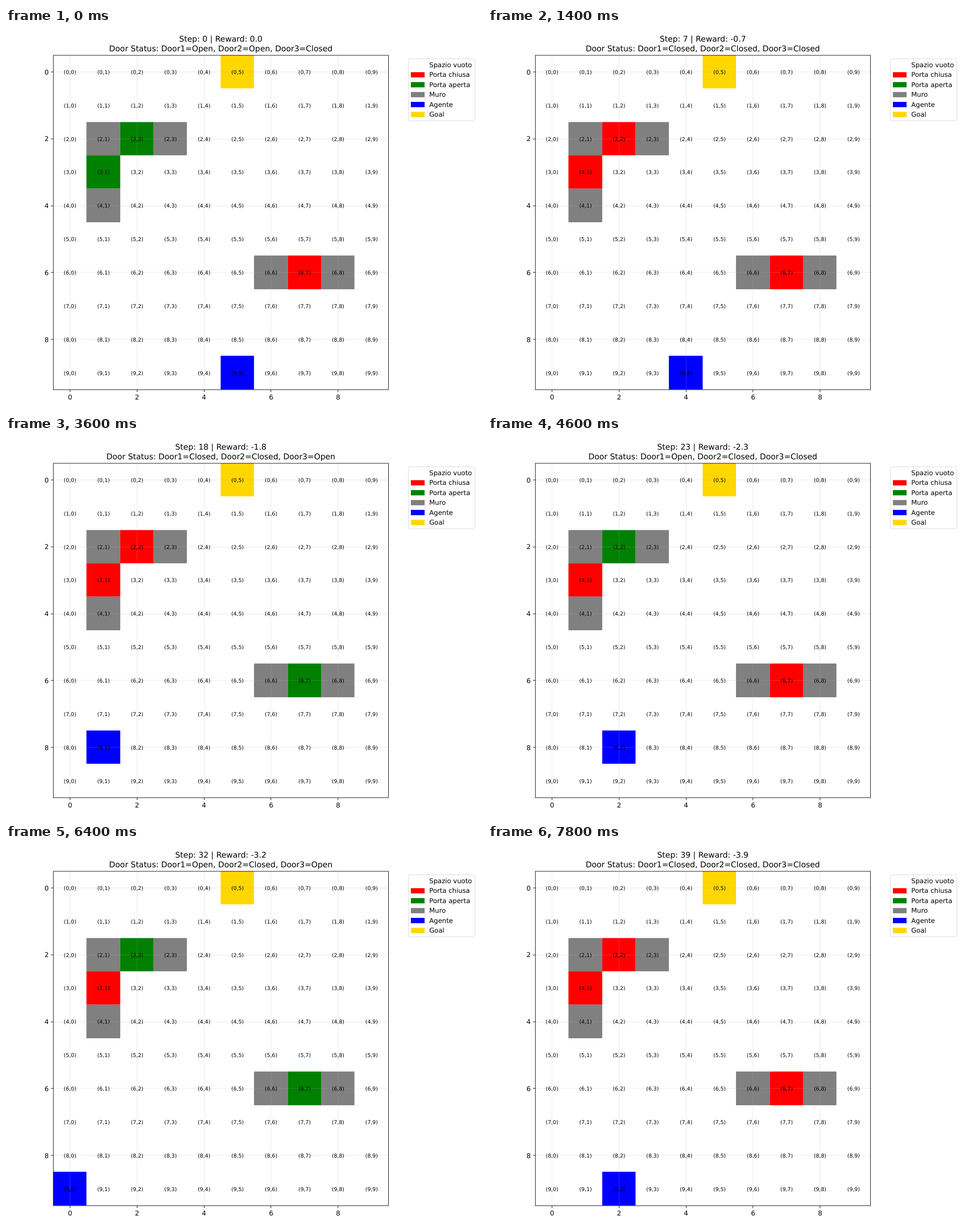
These frames come from a looping animation (837 px wide and 669 px high, 8 s). An HTML page:

```html
<!DOCTYPE html>
<html lang="it">
<head>
<meta charset="utf-8">
<title>Grid agent</title>
<style>
  html, body { margin: 0; width: 100%; height: 100%; overflow: hidden; background: #fff; }
  svg { display: block; width: 837px; height: 669px; }
  text { font-family: "DejaVu Sans", Verdana, sans-serif; text-anchor: middle; text-rendering: geometricPrecision; }
  .left { text-anchor: start; }
</style>
</head>
<body>
<svg id="stage" viewBox="0 0 1000 800" preserveAspectRatio="none"></svg>
<script>
// The plot is laid out on a 1000 x 800 sheet at 100 dots per inch
const STEP_MS = 200, N = 10, PITCH = 70.4, LEFT = 99.3, TOP = 57.25;
const pt = size => size * 100 / 72;

const EMPTY = '#ffffff', RED = '#ff0000', GREEN = '#008000';
const GRAY = '#808080', BLUE = '#0000ff', GOLD = '#ffd700';

// One letter per step: up, down, left, right, or a dot for staying
const MOVES = '...L...LLLL...U.R..L.RR.L.L.D.....R..R.';
const DIRS = { U: [-1, 0], D: [1, 0], L: [0, -1], R: [0, 1], '.': [0, 0] };
const STEPS = MOVES.length + 1;

const walls = [[2, 1], [2, 3], [4, 1], [6, 6], [6, 8]];
const doors = [
  { at: [2, 2], open: true, toggles: [7, 22, 38] },
  { at: [3, 1], open: true, toggles: [3] },
  { at: [6, 7], open: false, toggles: [16, 20, 27, 34] }
];

const svg = document.getElementById('stage');
const mid = (origin, i) => origin + PITCH * (i + 0.5);
const edge = (origin, i) => Math.round(origin + PITCH * i - 0.45);
const snap = v => Math.floor(v) + 0.5;

function add(tag, attrs, text) {
  const el = document.createElementNS(svg.namespaceURI, tag);
  set(el, attrs);
  if (text !== undefined) el.textContent = text;
  return svg.appendChild(el);
}

function set(el, attrs) {
  for (const key in attrs) el.setAttribute(key, attrs[key]);
}

function line(x1, y1, x2, y2, stroke) {
  add('line', { x1, y1, x2, y2, stroke });
}

function label(x, y, size, text, cls = '') {
  return add('text', { x, y, 'font-size': pt(size), class: cls }, text);
}

function place(el, [r, c]) {
  const x = edge(LEFT, c), y = edge(TOP, r);
  set(el, { x, y, width: edge(LEFT, c + 1) - x, height: edge(TOP, r + 1) - y });
}

function cell(pos, fill) {
  const el = add('rect', { fill });
  place(el, pos);
  return el;
}

const x0 = snap(LEFT), x1 = snap(LEFT + N * PITCH);
const y0 = snap(TOP), y1 = snap(TOP + N * PITCH);

add('rect', { width: 1000, height: 800, fill: EMPTY });
walls.forEach(pos => cell(pos, GRAY));
cell([0, 5], GOLD);
doors.forEach(door => { door.el = cell(door.at, RED); });
const agent = cell([9, 5], BLUE);

for (let i = 0; i < N; i += 2) {
  const x = snap(mid(LEFT, i)), y = snap(mid(TOP, i));
  const grid = 'rgba(176,176,176,0.3)';
  line(x, y0, x, y1, grid);
  line(x0, y, x1, y, grid);
  line(x, y1, x, y1 + 5, '#000');
  line(x0 - 5, y, x0, y, '#000');
  label(mid(LEFT, i), 782, 10, i);
  label(85.4, mid(TOP, i) + 5.3, 10, i);
}
add('rect', { x: x0, y: y0, width: x1 - x0, height: y1 - y0, fill: 'none', stroke: '#000' });

for (let r = 0; r < N; r++)
  for (let c = 0; c < N; c++)
    label(mid(LEFT, c), mid(TOP, r) + 4.2, 8, `(${r},${c})`);

add('rect', { x: 845.5, y: 64.8, width: 139.5, height: 130.5, rx: 2.8, fill: EMPTY, stroke: '#d6d6d6' });
[['Spazio vuoto', EMPTY], ['Porta chiusa', RED], ['Porta aperta', GREEN],
 ['Muro', GRAY], ['Agente', BLUE], ['Goal', GOLD]].forEach(([name, fill], i) => {
  const y = 82.5 + 20.87 * i;
  add('rect', { x: 850.6, y: y - 10.4, width: 28.8, height: 11.1, fill });
  label(889.3, y, 10, name, 'left');
});

const centre = LEFT + N * PITCH / 2;
const head = label(centre, 28.6, 12, '');
const status = label(centre, 49, 12, '');

const agentAt = step => [...MOVES.slice(0, step)].reduce(
  ([r, c], m) => [r + DIRS[m][0], c + DIRS[m][1]], [9, 5]);

// Every toggle passed so far flips the door
const isOpen = (door, step) =>
  door.toggles.filter(t => t <= step).length % 2 ? !door.open : door.open;

function render(step) {
  place(agent, agentAt(step));
  const states = doors.map((door, i) => {
    const open = isOpen(door, step);
    set(door.el, { fill: open ? GREEN : RED });
    return `Door${i + 1}=${open ? 'Open' : 'Closed'}`;
  });
  head.textContent = `Step: ${step} | Reward: ${step ? '-' : ''}${(step / 10).toFixed(1)}`;
  status.textContent = 'Door Status: ' + states.join(', ');
}

const start = performance.now();
function tick() {
  render(Math.floor((performance.now() - start) / STEP_MS) % STEPS);
  requestAnimationFrame(tick);
}
tick();
</script>
</body>
</html>
```
